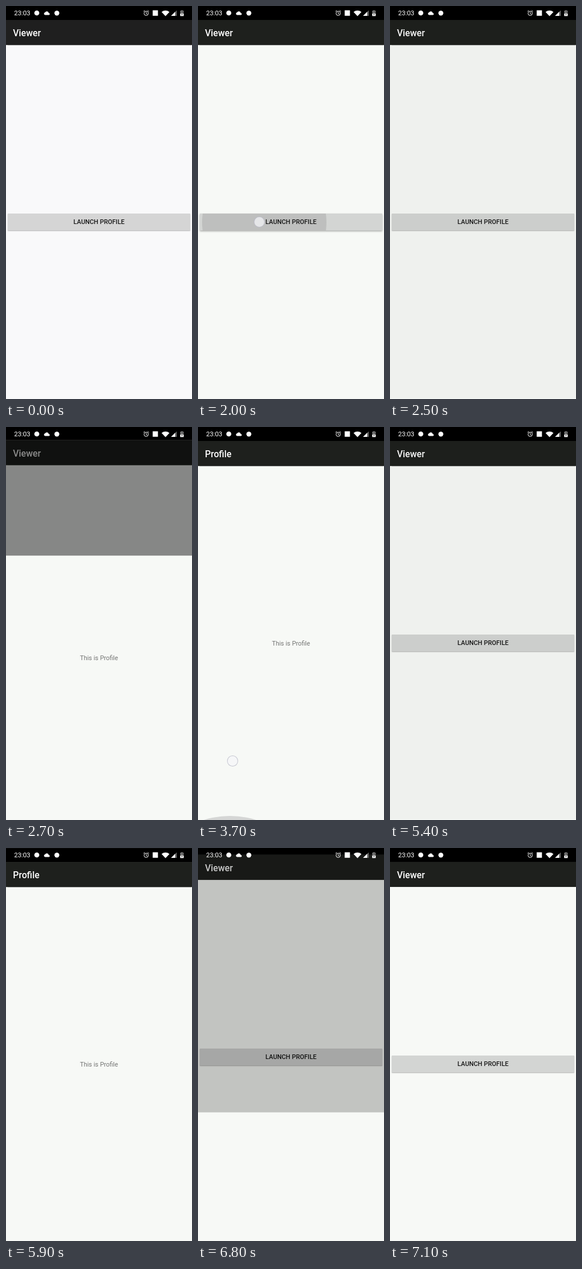
These frames come from a looping animation (320 by 676 pixels, 7.2 s). An HTML page:

```html
<!DOCTYPE html>
<html lang="en">
<head>
<meta charset="utf-8">
<title>Screen transitions</title>
<style>
  :root { --page: #f7f9f6; --bar: #1e201d; --btn: #d3d5d3; }
  :root.fresh { --page: #f9f9fa; --bar: #1f1f1f; --btn: #d5d5d5; }
  html, body { margin: 0; width: 100%; height: 100%; overflow: hidden; background: #000; }
  body { font-family: Roboto, "Noto Sans", sans-serif; }
  #stage { position: relative; width: 320px; height: 676px; overflow: hidden; background: #000; }
  .win { position: absolute; inset: 0; background: var(--page); }
  .win::before { content: ""; position: absolute; left: 0; right: 0; top: 0; height: 24px; background: #000; z-index: 1; }
  .bar {
    position: absolute; left: 0; right: 0; top: 24px; height: 43px; padding-left: 12px;
    background: var(--bar); color: #fff; font-weight: 500; font-size: 15.6px; line-height: 46px;
    box-shadow: 0 .5px 1px rgba(0, 0, 0, .25);
  }
  .btn {
    position: absolute; left: 3px; top: 357px; width: 314px; height: 29px; overflow: hidden;
    border-radius: 1px; background: var(--btn); color: #161616; text-align: center;
    font-weight: 500; font-size: 10.9px; line-height: 30px; box-shadow: 0 1px 1.5px rgba(0, 0, 0, .28);
  }
  .btn.down { box-shadow: 0 1.5px 3px rgba(0, 0, 0, .32); }
  .btn span { position: relative; }
  .label {
    position: absolute; left: 0; right: 0; top: 363px; text-align: center;
    color: #737473; font-size: 10.9px; line-height: 20px;
  }
  #dim { position: absolute; inset: 0; background: #000; z-index: 2; }
  #ripple, #hump, #dot { position: absolute; border-radius: 50%; }
  #ripple { background: rgba(0, 0, 0, .1); }
  #hump { width: 296px; height: 296px; left: -93px; top: 669px; background: #d5d6d5; }
  #dot {
    width: 17px; height: 17px; margin: -9.5px; border: 1px solid rgba(120, 120, 142, .38);
    background: rgba(246, 247, 249, .7);
  }
  #status { position: absolute; left: 0; top: 0; }
</style>
</head>
<body>
<div id="stage">
  <div class="win" id="home">
    <div class="bar">Viewer</div>
    <div class="btn" id="btn"><div id="ripple"></div><span>LAUNCH PROFILE</span></div>
    <div id="dim"></div>
  </div>
  <div class="win" id="profile">
    <div class="bar">Profile</div>
    <div class="label">This is Profile</div>
  </div>
  <div id="hump"></div>
  <svg id="status" width="320" height="24" fill="#fff">
    <text x="14" y="16.4" font-size="11.2">23:03</text>
    <circle cx="53" cy="12" r="4.3"/>
    <path d="M67.2 15.6a2.3 2.3 0 0 1 0-4.5 3.4 3.4 0 0 1 6.3.8 1.9 1.9 0 0 1 .5 3.7z"/>
    <circle cx="87.5" cy="12.2" r="4.2"/>
    <g fill="none" stroke="#fff">
      <circle cx="241.2" cy="12.6" r="3.7"/>
      <path d="M241.2 10.4v2.5l1.8 1M236.6 9.4l2.2-1.9M245.8 9.4l-2.2-1.9"/>
    </g>
    <rect x="252.4" y="7.4" width="9" height="9.4"/>
    <path d="M267.6 10.2q6.8-4.8 13.6 0L274.4 17.4z"/>
    <path d="M284 17L293.8 7.4V17z" fill="#666"/>
    <path d="M284 17L291 10.1V17z"/>
    <path d="M301.5 8V7.3h2.4V8H305.6V17.2H299.8V8z" fill="#777"/>
    <path d="M299.8 13h5.8v4.2h-5.8z"/>
    <path d="M303.3 9.4l-2 3.7h1.2v2.7l2-3.7h-1.2z" stroke="#000" stroke-width=".5"/>
  </svg>
  <div id="dot"></div>
</div>
<script>
const LOOP = 7200, TICK = 100, H = 676;
const REVEAL = 480;             // wipe of the upper screen
const WAIT = 144, MOVE = 390;   // shift of both screens, after the wipe begins
const SHIFT = 28, LIFT = 13.5, SHADE = 0.46;

const taps = [
  { x: 105, y: 371.5, from: 2000, press: 1900, end: 2300 },
  { x: 61, y: 372.5, from: 4900, press: 4900, end: 5200 }
];
const swipes = [3700, 6600];
const visits = [{ open: 2486, close: 3786 }, { open: 5386, close: 6586 }];

const $ = id => document.getElementById(id);
const clamp = v => Math.min(1, Math.max(0, v));

// Ease of cubic-bezier(.4, 0, .2, 1)
function smooth(x) {
  if (x <= 0) return 0;
  if (x >= 1) return 1;
  let lo = 0, hi = 1;
  for (let i = 0; i < 30; i++) {
    const u = (lo + hi) / 2, v = 1 - u;
    if (1.2 * u * v * v + 0.6 * u * u * v + u * u * u < x) lo = u; else hi = u;
  }
  return lo * lo * (3 - 2 * lo);
}

// How far the profile screen is in: moved, revealed and shading the one below
function slide(t) {
  const v = visits.find(v => t >= v.open && t < v.close + WAIT + MOVE);
  if (!v) return { move: 0, reveal: 0, shade: 0 };
  const closing = t >= v.close;
  const age = t - (closing ? v.close : v.open);
  const side = p => closing ? 1 - p : p;
  return {
    move: side(smooth((age - WAIT) / MOVE)),
    reveal: side(smooth(age / REVEAL)),
    shade: side(clamp(age / (closing ? 400 : 210)))
  };
}

function place(el, x, y) {
  el.style.left = x + "px";
  el.style.top = y + "px";
}

function show(el, on) {
  el.style.visibility = on ? "visible" : "hidden";
}

function drawWindows(t) {
  const { move, reveal, shade } = slide(t);
  $("home").style.transform = `translateY(${-LIFT * move}px)`;
  $("dim").style.opacity = SHADE * shade;
  show($("profile"), reveal > 0);
  $("profile").style.transform = `translateY(${SHIFT * (1 - move)}px)`;
  $("profile").style.clipPath = `inset(${(H - SHIFT) * (1 - reveal)}px 0 0 0)`;
}

function drawTouch(t) {
  const tap = taps.find(p => t >= p.from && t < p.end);
  const swiped = swipes.some(s => t >= s && t < s + TICK);
  const age = tap ? t - tap.press : 0;
  const r = 1.07 * age;
  const ripple = $("ripple");
  ripple.style.width = ripple.style.height = 2 * r + "px";
  ripple.style.opacity = tap ? clamp((tap.end - t) / 200) : 0;
  if (tap) {
    const cx = tap.x + (160 - tap.x) * clamp(age / 600);
    place(ripple, cx - 3 - r, 14.5 - r);
  }
  $("btn").classList.toggle("down", age > 0);

  const held = tap && age <= 100 ? tap : swiped ? { x: 59, y: 574 } : null;
  show($("dot"), held);
  if (held) place($("dot"), held.x, held.y);
  show($("hump"), swiped);
}

function frame() {
  const t = Math.floor(performance.now() % LOOP / TICK) * TICK;
  document.documentElement.classList.toggle("fresh", t < 1200);
  drawWindows(t);
  drawTouch(t);
  requestAnimationFrame(frame);
}
frame();
</script>
</body>
</html>
```
